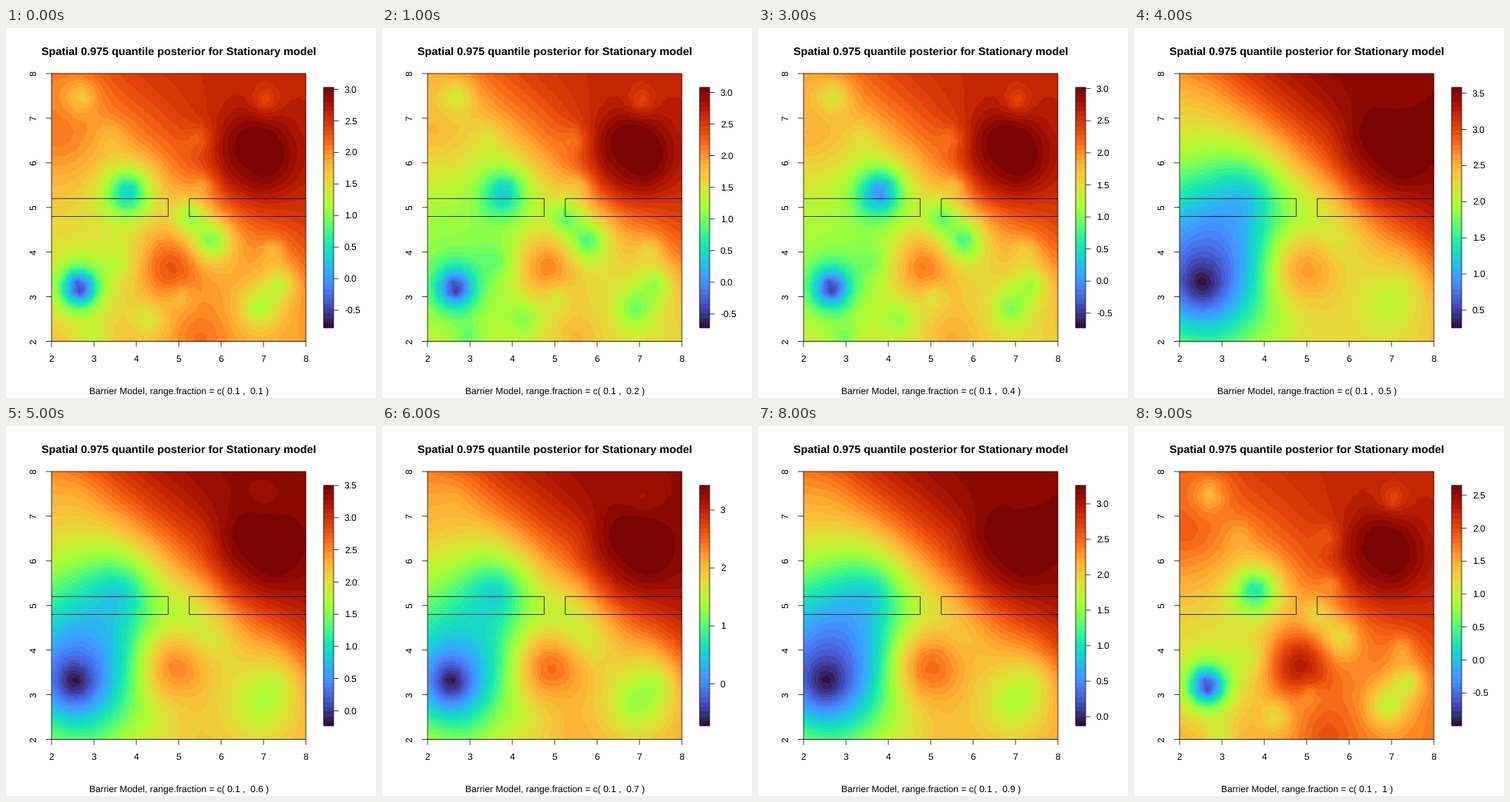
Write a matplotlib script that moves like this. It is 480 by 480 pixels and loops after 10 s.

```python
import numpy as np
import matplotlib.pyplot as plt
from matplotlib.animation import FuncAnimation
from matplotlib.tri import Triangulation, LinearTriInterpolator

plt.rcParams["font.family"] = ["Liberation Sans", "DejaVu Sans"]
plt.rcParams["text.hinting"] = "none"

PX = 0.72                                        # points per pixel at 100 dpi
L, R, T, B = 59.04, 389.04, 59.04, 406.56        # map edges in pixels
BAR_L, BAR_R, BAR_T, BAR_B = 412, 425, 77, 389   # colour key edges
CELLS, LEVELS = 300, 50

# Small dips (x, y, radius, depth); a negative depth is a rise
DIPS = [
    (2.7, 7.5, 0.4, 0.14), (3.4, 6.6, 0.4, 0.07), (7.05, 7.4, 0.3, 0.1),
    (5.6, 5.5, 0.28, 0.08), (5.5, 6.55, 0.28, 0.08), (7.25, 4.05, 0.3, 0.1),
    (5.05, 3, 0.3, 0.1), (4.3, 2.5, 0.4, 0.12), (2.95, 2.05, 0.35, 0.12),
    (3.65, 3.8, 0.45, 0.09), (5.5, 2.1, 0.8, -0.09), (2.1, 6.6, 1, -0.08),
]

# Range fraction: key minimum, key maximum, smoothness, base level, then the
# strength of the cool west, middle rise, north-west, valley and east dips
KEYS = {
    0.1: (-0.78, 3.03, 0, 0.68, 0.08, 0.15, 0.40, 0.29, 0.20),
    0.2: (-0.72, 3.08, 0, 0.58, 0.10, 0.18, 0.31, 0.25, 0.18),
    0.4: (-0.73, 3.02, 0, 0.60, 0.10, 0.17, 0.43, 0.27, 0.18),
    0.5: (0.255, 3.58, 1, 0.62, 0.38, 0.22, 0.18, 0.08, 0.09),
    0.7: (-0.725, 3.425, 0.8, 0.66, 0.28, 0.22, 0.25, 0.13, 0.17),
    0.9: (-0.13, 3.26, 1, 0.67, 0.43, 0.24, 0.18, 0.06, 0.14),
    1.0: (-1.0, 2.65, 0, 0.73, 0.13, 0.22, 0.37, 0.18, 0.22),
}


def make_mesh(step=0.2):
    rng = np.random.default_rng(4)
    axis = np.arange(1.7, 8.4, step)
    x, y = np.meshgrid(axis, axis)
    x[::2] += step / 2
    x += rng.uniform(-0.04, 0.04, x.shape)
    y += rng.uniform(-0.04, 0.04, y.shape)
    return x.ravel(), y.ravel()


X, Y = make_mesh()
TRI = Triangulation(X, Y)
GX, GY = np.meshgrid(np.linspace(2, 8, CELLS), np.linspace(2, 8, CELLS))


def bump(x, y, radius, power=1.5):
    return np.exp(-(np.hypot(X - x, Y - y) / radius) ** power)


def surface(smooth, base, cool, mid, north, valley, east):
    """Heat from 0 to 1 on the cell grid."""
    wide = 1 + 0.8 * smooth
    amp = 0.89 + 0.09 * smooth - base
    z = base + amp / (1 + np.exp(12.5 - X - 1.2 * Y))
    core = np.hypot(X - 6.75, Y - 6.1)
    z += (0.99 - base - 0.8 * amp) / (1 + core ** 4)
    z -= cool * bump(2.5, 4, 2.1, 2)
    z += mid * bump(4.8, 3.65, 0.75 + 0.15 * smooth, 2)
    z -= north * bump(3.8 - 0.2 * smooth, 5.35, 0.55 * wide)
    z -= valley * (0.8 * bump(5.25, 4.8, 0.4 * wide) + bump(5.8, 4.25, 0.45 * wide))
    z -= east * (bump(6.9, 2.75, 0.45 * wide) + 0.9 * bump(7.4, 3.3, 0.4 * wide))
    for x, y, radius, depth in DIPS:
        z -= depth * (1 - 0.8 * smooth) * bump(x, y, radius * wide)
    # The deepest point falls to zero
    z *= 1 - bump(2.65 - 0.12 * smooth, 3.2 + 0.12 * smooth,
                  0.42 * (1 + smooth), 1.4)
    return np.clip(np.asarray(LinearTriInterpolator(TRI, z)(GX, GY)), 0, 1)


def state(fraction):
    columns = zip(*KEYS.values())
    lo, hi, *shape = [np.interp(fraction, list(KEYS), c) for c in columns]
    return surface(*shape), lo, hi


STATES = [state(k / 10) for k in range(1, 11)]

fig = plt.figure(figsize=(4.8, 4.8), dpi=100, facecolor="white")
ax = fig.add_axes([0, 0, 1, 1])
ax.axis("off")


def line(xs, ys):
    return ax.plot(xs, ys, color="black", lw=0.75 * PX, zorder=3, snap=False,
                   solid_capstyle="butt", solid_joinstyle="miter")[0]


def label(x, y, s, size=12, **kw):
    kw = {"ha": "center", "va": "baseline", **kw}
    return ax.text(x, y, s, fontsize=size * PX, color="black", **kw)


def box(l, r, t, b):
    line([l, r, r, l, l], [t, t, b, b, t])


def to_px(x, y):
    return L + (x - 2) / 6 * (R - L), B - (y - 2) / 6 * (B - T)


cmap = plt.get_cmap("turbo", LEVELS)
style = dict(cmap=cmap, vmin=0, vmax=1, interpolation="nearest",
             aspect="auto", origin="lower")
heat = ax.imshow(STATES[0][0], extent=(L, R, B, T), **style)
ax.imshow((np.arange(LEVELS)[:, None] + 0.5) / LEVELS,
          extent=(BAR_L, BAR_R, BAR_B, BAR_T), **style)
ax.set_xlim(0, 480)
ax.set_ylim(480, 0)

box(L, R, T, B)
box(BAR_L, BAR_R, BAR_T, BAR_B)
for k in range(2, 9):
    x, y = to_px(k, k)
    line([x, x], [B, B + 7.2])
    line([L - 7.2, L], [y, y])
    label(x, 433.2, str(k))
    label(42, y, str(k), rotation=90, ha="right", va="center")

# Two barriers with a gap between them
for edge, gap in ((2, 4.75), (8, 5.25)):
    x0, y0 = to_px(edge, 5.2)
    x1, y1 = to_px(gap, 4.8)
    line([x0, x1, x1, x0], [y0, y0, y1, y1])

label(224.04, 35, "Spatial 0.975 quantile posterior for Stationary model",
      14.4, weight="bold")
caption = label(224.04, 476, "")
ticks = [(line([BAR_R, BAR_R + 6.5], [0, 0]), label(439, 0, "", ha="left"))
         for _ in range(10)]


def draw(i):
    field, lo, hi = STATES[i]
    heat.set_data(field)
    caption.set_text(f"Barrier Model, range.fraction = c( 0.1 ,  {(i + 1) / 10:g} )")
    step = 0.5 if hi - lo < 4 else 1
    marks = np.arange(np.ceil(lo / step + 0.02), np.floor(hi / step) + 1) * step
    for j, (tick, text) in enumerate(ticks):
        shown = j < len(marks)
        tick.set_visible(shown)
        text.set_visible(shown)
        if shown:
            v = marks[j] + 0.0
            y = BAR_B - (v - lo) / (hi - lo) * (BAR_B - BAR_T)
            tick.set_ydata([y, y])
            text.set_y(y + 4)
            text.set_text(f"{v:.1f}" if step < 1 else f"{v:.0f}")
    return []


anim = FuncAnimation(fig, draw, frames=10, interval=1000, repeat=True,
                     repeat_delay=0, blit=False)
plt.show()
```
